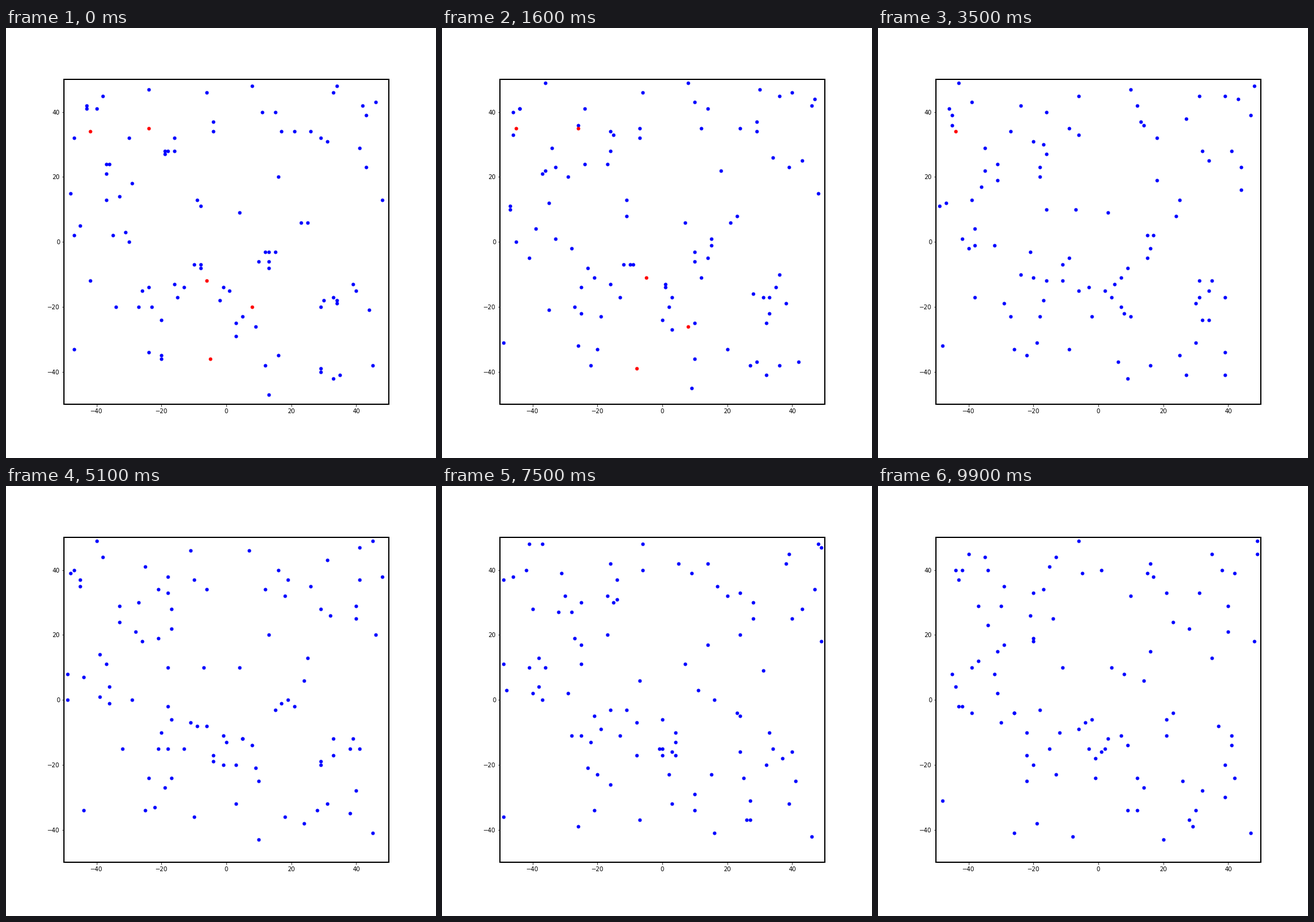
Write a matplotlib script that moves like this. It is 720 by 720 pixels and loops after 10 s.

```python
import random

import matplotlib.pyplot as plt
import numpy as np
from matplotlib.animation import FuncAnimation

FRAMES, INTERVAL = 100, 100
EDGE = 49
TOTAL = 100
rng = random.Random(4)

INFECTED = [(-42, 34), (-24, 35), (-6, -12), (8, -20), (-5, -36)]

# The first of these is infected later, by its neighbour.
SINGLES = [
    (-47, 32), (-24, 47), (8, 48), (46, 43), (-30, 32), (41, 29),
    (43, 23), (16, 20), (-48, 15), (4, 9), (48, 13), (-42, -12),
    (44, -21), (-34, -20), (-47, -33), (29, -39), (45, -38),
    (13, -47), (-6, 46),
]

# Each of these has one or two companions close by.
CLUSTERS = [
    (-36, 24), (29, 32), (10, -6), (1, -15), (33, -42), (30, -18),
    (-31, 3), (-33, 14), (-19, 28), (-13, -14), (-8, -7), (-23, -20),
    (-20, -35), (15, -3), (-43, 41), (-40, 41), (34, 48), (43, 39),
    (-4, 37), (11, 40), (21, 34), (-16, 28), (-8, 11), (23, 6),
    (-47, 2), (-24, -14), (33, -17), (9, -26), (3, -29), (12, -38),
    (39, -13),
]


def clamp(v):
    return max(-EDGE, min(EDGE, v))


def companion(x, y, taken):
    """A free place a few units away from (x, y)."""
    while True:
        place = tuple(clamp(v + rng.randint(-4, 4)) for v in (x, y))
        if place not in taken:
            return place


def walk(x, y):
    """One unit step along one axis at a time, kept inside the box."""
    path = [(x, y)]
    while len(path) < FRAMES:
        step = rng.choice((-1, 1))
        if rng.random() < 0.5:
            x = clamp(x + step)
        else:
            y = clamp(y + step)
        path.append((x, y))
    return path


starts = INFECTED + SINGLES + CLUSTERS
for i in range(TOTAL - len(starts)):
    starts.append(companion(*CLUSTERS[i % len(CLUSTERS)], starts))
paths = np.array([walk(*p) for p in starts])

index = np.arange(TOTAL)
late = len(INFECTED)
sick_from = np.where(index == late, 22, 0)
sick_until = np.where(index < late, 24 + 2 * index, 0)
sick_until[late] = 43

fig = plt.figure(figsize=(10, 10), dpi=72, facecolor="white")
ax = fig.add_axes([0.135, 0.125, 0.755, 0.755], xlim=(-50, 50), ylim=(-50, 50))
ax.set_xticks(range(-40, 41, 20))
ax.set_yticks(range(-40, 41, 20))
for spine in ax.spines.values():
    spine.set_linewidth(2)

healthy, = ax.plot([], [], "o", color="blue", ms=5)
infected, = ax.plot([], [], "o", color="red", ms=5)


def update(step):
    sick = (sick_from <= step) & (step < sick_until)
    now = paths[:, step]
    healthy.set_data(*now[~sick].T)
    infected.set_data(*now[sick].T)
    return healthy, infected


anim = FuncAnimation(fig, update, frames=FRAMES, interval=INTERVAL,
                     repeat=True, repeat_delay=0, blit=False)
plt.show()
```
